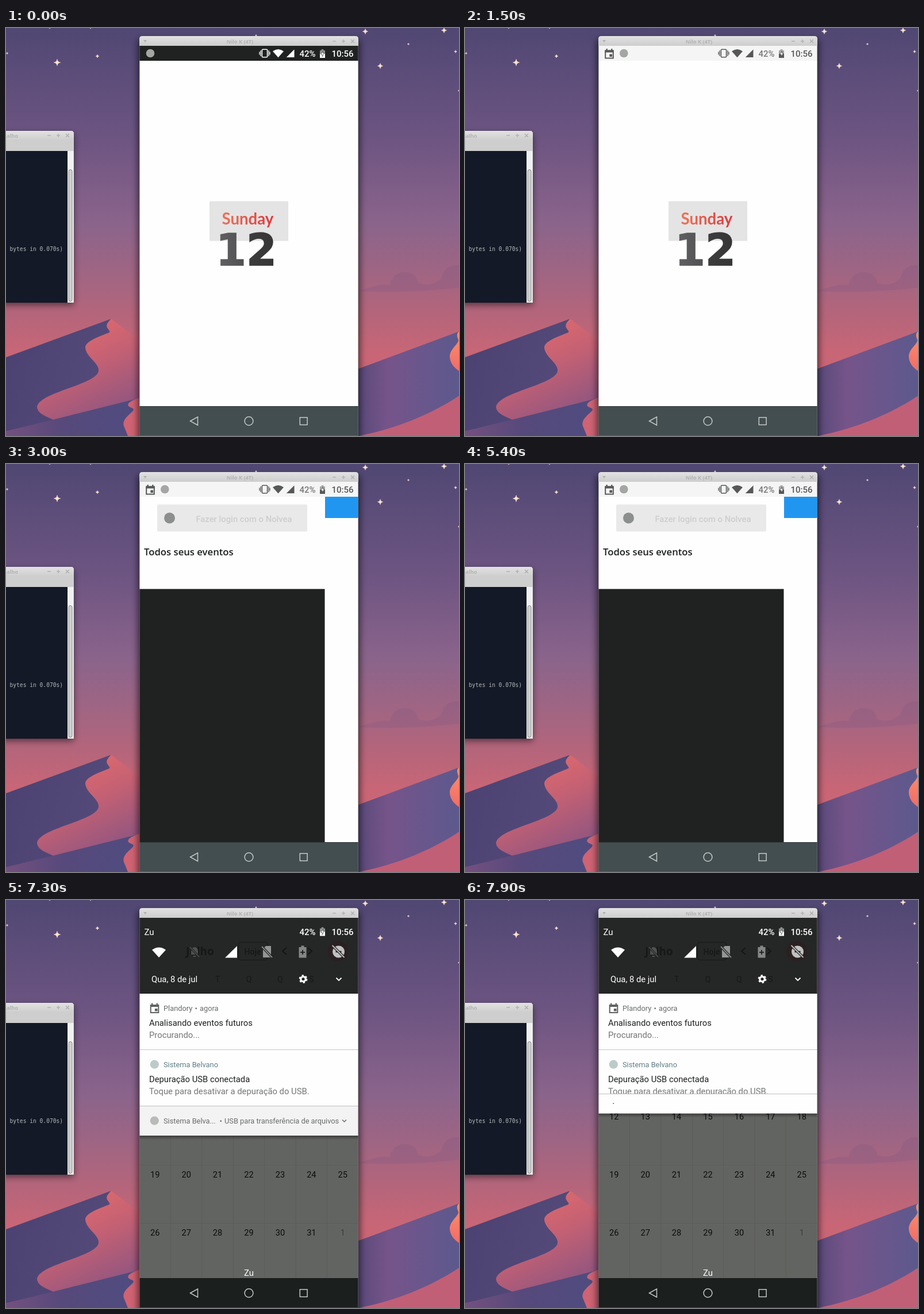
These frames come from a looping animation (788x710 px, 8000 ms). An HTML page:

```html
<!DOCTYPE html>
<html lang="pt">
<head>
<meta charset="utf-8">
<title>Agenda no celular</title>
<style>
  html, body { margin: 0; width: 100%; height: 100%; overflow: hidden; background: #514874; }
  svg { display: block; width: 100vw; height: 100vh; }
  text { font-family: Roboto, sans-serif; white-space: pre; }
  .bar { font: bold 9.2px "Open Sans", "Noto Sans", sans-serif; fill: #b3b3b3; }
  .clock { font-size: 15px; font-weight: 500; }
  .title { font-size: 14.8px; fill: #1e2020; }
  .body { font-size: 14.8px; fill: #747675; }
  .meta { font-size: 12.8px; fill: #696b6a; }
  .ghost { fill: #161817; }
  .line { fill: none; stroke: currentColor; }
  .bolt { fill: #fff; stroke: #444; stroke-width: .7; }
</style>
</head>
<body>
<svg viewBox="0 0 788 710" xmlns="http://www.w3.org/2000/svg">
  <defs>
    <linearGradient id="sky" x2="0" y2="1">
      <stop stop-color="#504773"/><stop offset=".28" stop-color="#6e5582"/>
      <stop offset=".48" stop-color="#8b648b"/><stop offset=".6" stop-color="#a06583"/>
      <stop offset=".7" stop-color="#b4657b"/><stop offset=".8" stop-color="#c96676"/>
      <stop offset="1" stop-color="#cf6675"/>
    </linearGradient>
    <linearGradient id="chrome" x2="0" y2="1">
      <stop stop-color="#e2e2e2"/><stop offset="1" stop-color="#cdcdcd"/>
    </linearGradient>
    <linearGradient id="dune" x2="1" y2=".3">
      <stop stop-color="#4b4272"/><stop offset="1" stop-color="#534a7a"/>
    </linearGradient>
    <linearGradient id="lit" gradientUnits="userSpaceOnUse" x1="130" y1="530" x2="200" y2="670">
      <stop stop-color="#d9686e"/><stop offset=".4" stop-color="#c26074"/><stop offset="1" stop-color="#8e5580"/>
    </linearGradient>
    <linearGradient id="front" x2="1" y2="0">
      <stop stop-color="#73507f"/><stop offset=".45" stop-color="#56497b"/><stop offset="1" stop-color="#4f4c80"/>
    </linearGradient>
    <linearGradient id="east" x2="1" y2="0">
      <stop stop-color="#5a4a7a"/><stop offset=".3" stop-color="#76548a"/><stop offset="1" stop-color="#5c598d"/>
    </linearGradient>
    <linearGradient id="glow" x2="0" y2="1">
      <stop stop-color="#ff9068"/><stop offset="1" stop-color="#ef6c68"/>
    </linearGradient>
    <linearGradient id="red" x2="1" y2="0">
      <stop stop-color="#ee7358"/><stop offset="1" stop-color="#dd393e"/>
    </linearGradient>
    <linearGradient id="ink" x2="1" y2="0">
      <stop stop-color="#626264"/><stop offset=".44" stop-color="#525254"/>
      <stop offset=".52" stop-color="#3d3d3e"/><stop offset="1" stop-color="#353536"/>
    </linearGradient>
    <linearGradient id="fall" x2="0" y2="1">
      <stop stop-color="#000" stop-opacity=".38"/><stop offset="1" stop-color="#000" stop-opacity="0"/>
    </linearGradient>
    <filter id="soft" x="-20%" y="-10%" width="140%" height="120%"><feGaussianBlur stdDeviation="6"/></filter>
    <clipPath id="screen"><rect x="232" y="31" width="381" height="679"/></clipPath>

    <path id="wifi" d="M-9.5-3.5Q0-10.5 9.5-3.5L0 7.3Z" fill="currentColor"/>
    <path id="signal" d="M-6.7 7H7V-6.8Z" fill="currentColor"/>
    <g id="battery">
      <path d="M-4.5-5.5h2.6V-7.5h3.8v2H4.5V0h-9Z" fill="currentColor" opacity=".5"/>
      <path d="M-4.5 0h9V7.5h-9Z" fill="currentColor"/>
      <path class="bolt" d="M1-4.5-3 1.5H-.4V5.5L3.2-.8H.8Z"/>
    </g>
    <g id="vibrate" class="line" stroke-width="1.6">
      <rect x="-4.6" y="-6.8" width="9.2" height="13.6" rx="1.2"/>
      <path d="M-7-5V5M7-5V5M-9-2.5V2.5M9-2.5V2.5" stroke-width="1.3"/>
    </g>
    <g id="date">
      <path d="M-6.8-5.6H6.8V7.4H-6.8Z" class="line" stroke-width="2"/>
      <path d="M-7.5-6.5h15v4h-15ZM-5.4-9h2.2v4h-2.2ZM3.2-9h2.2v4H3.2ZM.4.4h4.6V5H.4Z" fill="currentColor"/>
    </g>
    <path id="buttons" d="M-35 0h6M-19 0h6M-16-3V3M-3-3 3 3M3-3-3 3" fill="none" stroke="#b2b2b2" stroke-width="1.5"/>
    <g id="stat">
      <use href="#vibrate" x="450" y="44"/><use href="#wifi" x="473.5" y="44"/>
      <use href="#signal" x="494.5" y="44"/><use href="#battery" x="550.5" y="44.5"/>
    </g>
    <path id="spark" d="M0-1Q.12-.12 1 0 .12.12 0 1-.12.12-1 0-.12-.12 0-1Z" fill="#fbe3cf" stroke="#fbe3cf" stroke-width=".14"/>
  </defs>

  <!-- desktop -->
  <rect width="788" height="710" fill="url(#sky)"/>
  <g id="stars"></g>
  <path d="M613 458Q650 444 668 447C673 418 713 418 717 444Q740 452 757 436C764 408 788 413 788 413V452Q700 462 613 458Z" fill="#7d5680" opacity=".28"/>
  <path d="M183 506 232 544V710H40L54 640 130 545Z" fill="url(#lit)"/>
  <path d="M0 573 183 506C176 513 173 517 177 523S183 529 174 532C154 540 137 547 138 557 140 573 163 584 161 597 157 621 56 634 54 660 55 671 70 676 83 682L0 702Z" fill="url(#dune)"/>
  <path d="M0 702 228 645V710H0Z" fill="url(#front)"/>
  <path d="M230 644C217 649 210 653 213 658 218 662 224 661 221 666 213 675 200 682 206 695L212 710H232V644Z" fill="#cf6373"/>
  <path d="M613 710V690L788 630V710Z" fill="#c15f77"/>
  <path d="M613 593 788 528V640C740 672 680 697 613 710Z" fill="url(#east)"/>
  <path d="M788 528C783 532 785 538 787 543 787 551 771 559 772 573 773 585 781 592 788 597Z" fill="url(#glow)"/>

  <!-- terminal -->
  <rect x="-20" y="184" width="138" height="298" rx="3" opacity=".5" filter="url(#soft)"/>
  <path d="M-5 179H113Q118 179 118 184V478H-5Z" fill="#cecece"/>
  <path d="M-5 179H113Q118 179 118 184V196H-5Z" fill="url(#chrome)"/>
  <text class="bar" x="21" y="191" text-anchor="end">Trabalho</text>
  <use href="#buttons" x="107" y="187"/>
  <rect x="-5" y="214" width="112" height="264" fill="#131926"/>
  <rect x="107" y="214" width="10.5" height="263.5" fill="#f1f1f1"/>
  <rect x="109" y="246.5" width="6" height="229" rx="3" fill="#d0d0d0" stroke="#8b8b8b"/>
  <text x="6.5" y="387.5" fill="#b4b8bb" style="font:9.62px 'DejaVu Sans Mono',monospace">bytes in 0.070s)</text>

  <!-- phone window -->
  <rect x="229" y="20" width="387" height="710" opacity=".55" filter="url(#soft)"/>
  <path d="M232 31V19Q232 14 237 14H608Q613 14 613 19V31Z" fill="url(#chrome)"/>
  <path d="M239 21h6l-3 4Z" fill="#b0b0b0"/>
  <text class="bar" x="407" y="27" text-anchor="middle">Nilo K (4T)</text>
  <use href="#buttons" x="603" y="23"/>

  <g clip-path="url(#screen)">
    <rect x="232" y="31" width="381" height="679" fill="#fdfefd"/>

    <g id="statusDark" color="#fff" fill="#fff">
      <rect x="232" y="31" width="381" height="26" fill="#1f2221"/>
      <circle cx="251" cy="44" r="7.3" fill="#a4a6a4"/>
      <use href="#stat"/>
      <text class="clock" x="510.5" y="50">42%</text><text class="clock" x="566.5" y="50">10:56</text>
    </g>
    <g id="statusLight" color="#565857" fill="#565857">
      <rect x="232" y="31" width="381" height="26" fill="#f4f5f4"/>
      <use href="#date" x="251" y="45"/>
      <circle cx="276.3" cy="44" r="7.3" fill="#a4a6a4"/>
      <use href="#stat"/>
      <text class="clock" x="510.5" y="50" fill="#777978">42%</text><text class="clock" x="566.5" y="50">10:56</text>
    </g>

    <g id="splash">
      <rect x="354" y="301.5" width="137" height="69" fill="#e4e4e4"/>
      <text x="375.5" y="342" fill="url(#red)" style="font:bold 27.6px Lato,sans-serif">Sunday</text>
      <text x="365" y="412.5" fill="url(#ink)" stroke="url(#ink)" stroke-width="1.6" style="font:bold 76px 'DejaVu Sans',sans-serif">12</text>
    </g>

    <g id="login">
      <rect x="263" y="70.5" width="261" height="47" rx="2" fill="#e8e9e8"/>
      <circle cx="284.5" cy="94" r="9.5" fill="#8d8f8e"/>
      <text x="414" y="100.5" text-anchor="middle" fill="#cdcecd" font-size="14.8" font-weight="500">Fazer login com o Nolvea</text>
      <text x="240" y="159" fill="#1c1e1d" style="font:600 16.7px 'Open Sans',sans-serif">Todos seus eventos</text>
      <path d="M555 57H613V92Q613 94 611 94H555Z" fill="#2196f1"/>
      <rect x="232" y="217.5" width="322.5" height="441" fill="#1f2220"/>
    </g>

    <g id="panel">
      <rect x="232" y="163" width="381" height="496" fill="#626461"/>
      <g id="month" font-size="14.6" text-anchor="middle"></g>
      <text x="422.5" y="654" fill="#fff" font-size="15" text-anchor="middle">Zu</text>

      <rect x="232" y="31" width="381" height="132" fill="#252726"/>
      <g class="ghost" font-size="14">
        <text x="313" y="96" style="font:bold 19px 'Open Sans',sans-serif">Julho</text>
        <rect x="404.5" y="73.5" width="50" height="31" rx="4" fill="none" stroke="#1a1c1b" stroke-width="1.5"/>
        <text x="429" y="95" text-anchor="middle" font-weight="500">Hoje</text>
        <path d="M488 83l-7 6 7 6M525 83l7 6-7 6" fill="none" stroke="#141615" stroke-width="2"/>
        <circle cx="577" cy="89" r="18" fill="#2b2021"/>
        <g id="week" text-anchor="middle"></g>
      </g>
      <g fill="#fff" color="#fff">
        <text x="240.5" y="61" font-size="15">Zu</text>
        <text class="clock" x="510.5" y="61">42%</text><text class="clock" x="566.5" y="61">10:56</text>
        <use href="#battery" x="550.5" y="55"/>
        <use href="#wifi" transform="translate(266 91)scale(1.27 1.22)"/>
        <path d="M381 100.5H402V80Z"/>
        <g transform="translate(328 90)" color="#505251">
          <path d="M-6 5V-1Q-6-7 0-8 6-7 6-1V5ZM-2 7h4v2h-4Z" fill="currentColor"/>
          <path d="M-8-8 8 9" stroke="#252726" stroke-width="4"/><path class="line" d="M-8-8 8 9" stroke-width="1.5"/>
        </g>
        <g transform="translate(454 90)" color="#949695">
          <path d="M-7-5-2-10H7V10H-7Z" fill="currentColor"/>
          <path d="M-9-9 9 10" stroke="#252726" stroke-width="4"/><path class="line" d="M-9-9 9 10" stroke-width="1.8"/>
        </g>
        <path d="M509.5 82h4v-2.5h5V82h4v18.5h-13Z" fill="#858786"/>
        <path d="M512 91h8M516 87v8" stroke="#252726" stroke-width="2"/>
        <g transform="translate(578.5 90)" color="#bfc1c0">
          <circle r="10.5" fill="currentColor"/>
          <path d="M-5 0H5" stroke="#2b2021" stroke-width="2.5"/>
          <path d="M-11-11 10 10" stroke="#2b2021" stroke-width="4.5"/><path class="line" d="M-11-11 10 10" stroke-width="1.8"/>
        </g>
        <text x="253" y="143" font-size="14.8">Qua, 8 de jul</text>
        <g transform="translate(517 137.5)" fill="none" stroke="#fff">
          <circle r="4.2" stroke-width="3.2"/><circle r="6.3" stroke-width="2.2" stroke-dasharray="3.3 3.3"/>
        </g>
        <path class="line" d="M574.5 135.5l4.5 4.5 4.5-4.5" stroke-width="1.8"/>
      </g>

      <rect x="232" y="163" width="381" height="196" fill="#fdfefd"/>
      <use href="#date" x="258.5" y="188.5" color="#606261"/>
      <text class="meta" x="274" y="192.5">Plandory</text><text class="meta" x="328.5" y="192.5">•</text><text class="meta" x="337" y="192.5">agora</text>
      <text class="title" x="249" y="218.5">Analisando eventos futuros</text>
      <text class="body" x="249" y="239.5">Procurando...</text>
      <path d="M232 260.5H613" stroke="#c5c6c5"/>
      <circle cx="258.3" cy="286" r="7.6" fill="#bccaca"/>
      <text class="meta" x="274" y="291" style="fill:#5f7d88">Sistema Belvano</text>
      <text class="title" x="249" y="317">Depuração USB conectada</text>
      <text class="body" x="249" y="337.5">Toque para desativar a depuração do USB.</text>

      <rect id="drop" x="232" width="381" height="7" fill="url(#fall)"/>
      <rect id="strip" x="232" width="381"/>
      <path id="rule" d="M232 .5H613" stroke="#bfc0bf"/>
      <circle id="dot" cx="258.3"/>
      <g id="usb">
        <text class="meta" x="274">Sistema Belva...</text><text class="meta" x="371.5">•</text>
        <text class="meta" x="380">USB para transferência de arquivos</text>
        <path d="M585-6.5l3.5 3.5 3.5-3.5" fill="none" stroke="#696b6a" stroke-width="1.5"/>
      </g>
    </g>

    <rect id="nav" x="232" y="658" width="381" height="52"/>
    <path d="M232 658.5H613" stroke="#000" opacity=".2"/>
    <g fill="none" stroke="#c3c9c8" stroke-width="1.5">
      <path d="M320.5 684 333.5 676.8V691.2Z"/><circle cx="422.5" cy="684" r="7.4"/>
      <rect x="511.3" y="677.7" width="12.8" height="12.8"/>
    </g>
  </g>
  <path d="M232.5 31V709.5H612.5V31" fill="none" stroke="#777" opacity=".55"/>
</svg>
<script>
const $ = id => document.getElementById(id);

function set(el, attrs) {
  for (const k in attrs) el.setAttribute(k, attrs[k]);
}
function add(parent, tag, attrs, text) {
  const el = document.createElementNS("http://www.w3.org/2000/svg", tag);
  set(el, attrs);
  if (text !== undefined) el.textContent = text;
  parent.appendChild(el);
}
const show = (id, on) => { $(id).style.display = on ? "" : "none"; };

const stars = [[89, 60, 5.5], [159, 49, 3], [2, 44, 2], [76, 0, 1.5], [147, 0, 1.5], [435, 13, 2],
  [625, 6, 4.5], [651, 66, 4.5], [762, 4, 4.5], [700, 28, 2], [782, 41, 2.5], [788, 109, 2]];
for (const [x, y, r] of stars)
  add($("stars"), "use", { href: "#spark", transform: `translate(${x} ${y})scale(${r})` });

// month grid behind the notifications
const col = 381 / 7;
for (let i = 1; i < 7; i++)
  add($("month"), "path", { d: `M${232 + col * i} 163V658`, stroke: "#5b5d5a" });
for (const y of [360.5, 461.5, 562.5])
  add($("month"), "path", { d: `M232 ${y}H613`, stroke: "#5b5d5a" });
for (let i = 0; i < 21; i++) {
  const day = 12 + i, next = day > 31;
  add($("month"), "text", {
    x: 232 + col * (i % 7 + 0.5),
    y: 382 + Math.floor(i / 7) * 101.2,
    fill: next ? "#3c3e3c" : "#0c0d0c"
  }, next ? day - 31 : day);
}
[..."TQQS"].forEach((c, i) => add($("week"), "text", { x: 232 + col * (i + 2.5), y: 142.5 }, c));

// collapsing strip: start time, top, bottom, text baseline (0 = hidden), dot centre, dot radius, fill
const poses = [
  [7000, 358, 410, 389, 383.3, 7.6, "#f2f3f2"],
  [7300, 358, 410, 389, 384, 7.6, "#f2f3f2"],
  [7600, 358, 403, 384, 380, 7.4, "#f7f8f7"],
  [7900, 337, 371.5, 0, 354, 0.9, "#fdfefd"]
];

function render(t) {
  const open = t >= 7000;
  show("statusDark", t < 1500);
  show("statusLight", t >= 1500 && !open);
  show("splash", t < 3000);
  show("login", t >= 3000 && !open);
  show("panel", open);
  set($("nav"), { fill: open ? "#1b1f1e" : "#434e50" });
  if (!open) return;
  const [, top, bottom, base, cy, r, fill] = poses.filter(p => p[0] <= t).pop();
  set($("strip"), { y: top, height: bottom - top, fill });
  set($("drop"), { y: bottom });
  set($("rule"), { transform: `translate(0 ${top})` });
  set($("dot"), { cy, r, fill: base ? "#b9bbb9" : "#555756" });
  set($("usb"), { transform: `translate(0 ${base})` });
  show("usb", base > 0);
}

const start = performance.now();
function tick(now) {
  render(Math.max(0, now - start) % 8000);
  requestAnimationFrame(tick);
}
render(0);
requestAnimationFrame(tick);
</script>
</body>
</html>
```
